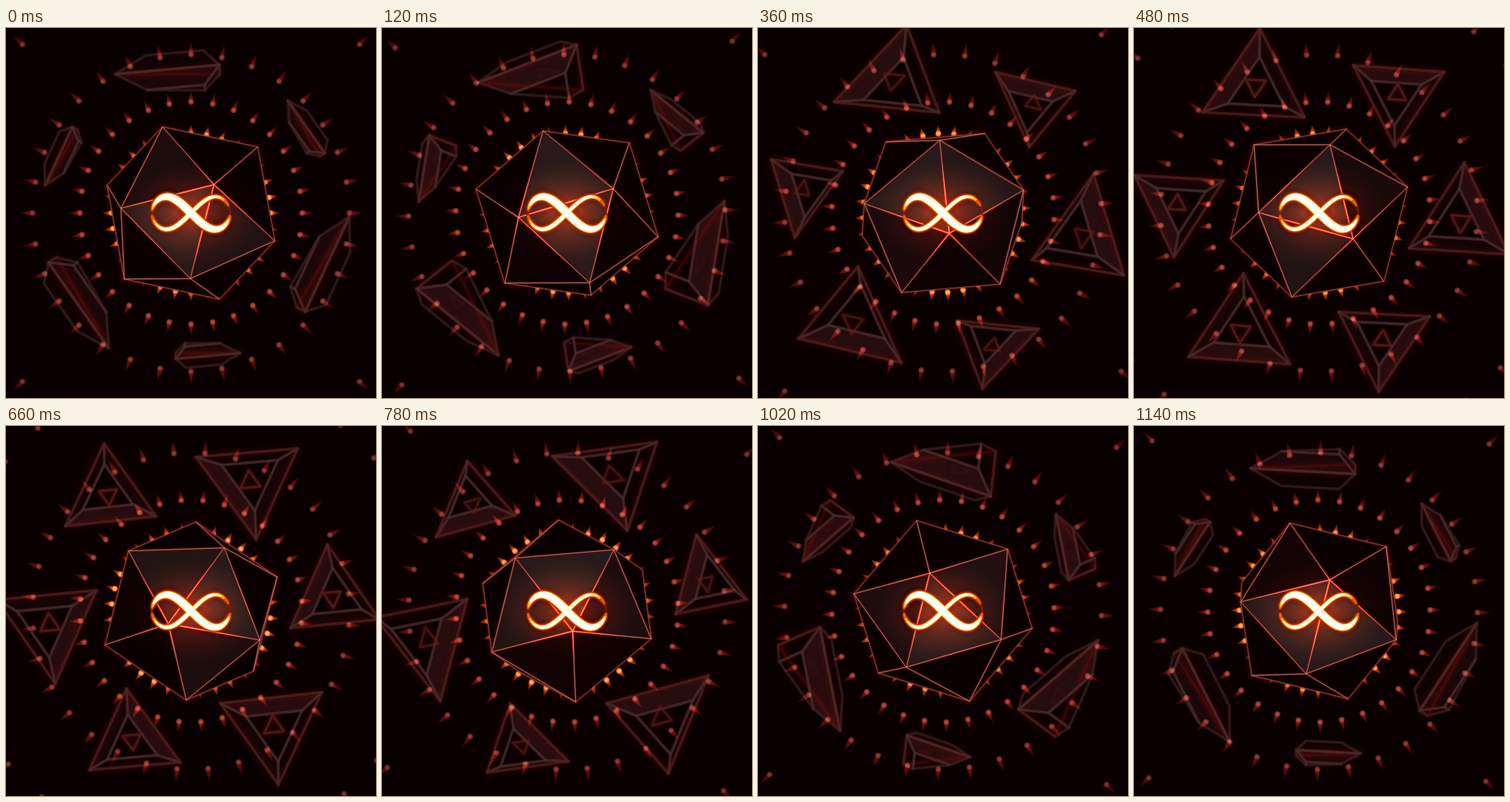
Write an HTML page with a canvas that moves like this. It is 500 by 500 pixels and loops after 1200 ms.

```html
<!DOCTYPE html>
<html lang="en">
<head>
<meta charset="utf-8">
<title>Infinity crystal</title>
<style>
  html, body { margin: 0; width: 100%; height: 100%; overflow: hidden; background: #0b0000; }
  canvas { display: block; }
</style>
</head>
<body>
<canvas id="stage" width="500" height="500"></canvas>
<script>
const ctx = document.getElementById('stage').getContext('2d');
const LOOP = 1200, STEP = 30, TAU = Math.PI * 2, PHI = (1 + Math.sqrt(5)) / 2;
const BACKGROUND = '#0b0000';
const clamp = v => Math.max(0, Math.min(1, v));

function trace(points) {
  ctx.beginPath();
  points.forEach(([x, y]) => ctx.lineTo(x, y));
  ctx.closePath();
}

function stroke(color, width, glow = 0, glowColor = color) {
  ctx.strokeStyle = color;
  ctx.lineWidth = width;
  ctx.shadowBlur = glow;
  ctx.shadowColor = glowColor;
  ctx.stroke();
  ctx.shadowBlur = 0;
}

function signedArea(points) {
  return points.reduce((sum, [x, y], i) => {
    const [nx, ny] = points[(i + 1) % points.length];
    return sum + (x * ny - y * nx) / 2;
  }, 0);
}

// --- Sparks: rings of 32 drops with tails pointing outwards
const rings = [
  { radius: 107, turn: -1, tail: 13, head: '255,205,130', body: '225,70,15' },
  { radius: 150, turn: 1, tail: 16, head: '135,82,74', body: '112,20,10' },
  { radius: 214, turn: -1, tail: 19, head: '105,70,66', body: '92,16,10' },
  { radius: 322, turn: -1, tail: 19, head: '90,66,64', body: '70,12,8' }
];

function drawRing({ radius, turn, tail, head, body }, t) {
  const fade = ctx.createLinearGradient(0, -radius + 3, 0, -radius - tail);
  fade.addColorStop(0, `rgba(${body},.35)`);
  fade.addColorStop(.4, `rgba(${body},.9)`);
  fade.addColorStop(1, `rgba(${body},.15)`);
  const spot = ctx.createRadialGradient(0, -radius, 0, 0, -radius, 5);
  spot.addColorStop(0, `rgba(${head},.85)`);
  spot.addColorStop(.5, `rgba(${head},.6)`);
  spot.addColorStop(1, `rgba(${body},0)`);
  for (let i = 0; i < 32; i++) {
    ctx.save();
    ctx.rotate((i + turn * t) * TAU / 32);
    ctx.beginPath();
    ctx.arc(0, -radius, 3.8, 0, Math.PI);
    ctx.lineTo(0, -radius - tail);
    ctx.fillStyle = fade;
    ctx.fill();
    ctx.fillStyle = spot;
    ctx.fillRect(-5, -radius - 5, 10, 10);
    ctx.restore();
  }
}

// --- Outer crystals: truncated triangular bipyramids tumbling along their orbit
function drawCrystal(index, t) {
  const tilt = Math.PI * (t + .025), s = Math.sin(tilt), c = Math.cos(tilt);
  const scale = 1 + (index % 2 ? -.24 : .24) * c;
  const triangle = (size, height, offset = Math.PI) => [0, 1, 2].map(k => {
    const a = offset + k * TAU / 3;
    const across = size * Math.sin(a) * s - height * c;
    return [size * Math.cos(a) * scale, across * scale];
  });
  const middle = triangle(76, 0), top = triangle(42, 19), bottom = triangle(42, -19);
  const sides = [0, 1, 2].flatMap(k => {
    const n = (k + 1) % 3;
    return [[middle[k], middle[n], top[n], top[k]], [middle[n], middle[k], bottom[k], bottom[n]]];
  }).filter(face => signedArea(face) > 0);

  ctx.save();
  ctx.rotate((-2.5 - 60 * t + 60 * index) * Math.PI / 180);
  ctx.translate(0, -192);
  ctx.scale(1, -1);
  ctx.lineJoin = 'round';
  for (const face of sides) {
    trace(face);
    const breadth = signedArea(face) / scale ** 2;
    ctx.fillStyle = `rgba(66,26,28,${.05 + .45 * clamp((breadth - 1500) / 600)})`;
    ctx.fill();
  }
  trace(middle);
  stroke('rgba(100,14,8,.35)', 4, 9, 'rgba(150,18,8,.9)');
  const outlines = [...sides, top];
  for (const face of outlines) {
    trace(face);
    stroke('rgba(82,18,14,.24)', 5);
  }
  for (const face of outlines) {
    trace(face);
    stroke('rgba(68,54,53,.42)', 3.2);
  }
  ctx.globalAlpha = s * s;
  trace(triangle(15, 0, 0));
  stroke('rgba(84,34,30,.75)', 3.5, 6, 'rgb(100,14,8)');
  ctx.restore();
}

// --- Icosahedron: half a turn about one of its two-fold axes per loop
const axes = [[.962, .203, -.188], [.239, -.951, .195], [.139, .2325, .963]];
const solid = [];
for (const a of [-1, 1]) {
  for (const b of [-PHI, PHI]) solid.push([a, b, 0], [0, a, b], [b, 0, a]);
}
const touching = (i, j) =>
  Math.abs(Math.hypot(...solid[i].map((v, k) => v - solid[j][k])) - 2) < .01;
const facets = [];
for (let i = 0; i < 12; i++)
  for (let j = i + 1; j < 12; j++)
    for (let k = j + 1; k < 12; k++)
      if (touching(i, j) && touching(j, k) && touching(i, k)) facets.push([i, j, k]);

function drawIcosahedron(t) {
  const s = Math.sin(Math.PI * t), c = Math.cos(Math.PI * t);
  const points = solid.map(([x, y, z]) => {
    const turned = [x * c + z * s, y, z * c - x * s];
    return [0, 1, 2].map(k => 66.8 * turned.reduce((sum, v, i) => sum + v * axes[i][k], 0));
  });
  const visible = facets.map(f => f.map(i => points[i]))
    .map(face => ({ face, facing: (face[0][2] + face[1][2] + face[2][2]) / 303 }))
    .filter(({ facing }) => facing > 0);
  ctx.lineJoin = 'round';
  for (const { face } of visible) {
    trace(face);
    stroke('rgba(120,18,8,.4)', 3, 7, 'rgba(160,22,8,.8)');
  }
  for (const { face, facing } of visible) {
    trace(face);
    ctx.fillStyle = BACKGROUND;
    ctx.fill();
    const light = clamp((facing - .62) / .26);
    ctx.fillStyle = `rgba(40,${12 + 14 * light},${14 + 12 * light},${light})`;
    ctx.fill();
  }
  for (const { face } of visible) {
    trace(face);
    stroke('rgba(125,26,16,.28)', 2.8, 3, 'rgba(130,20,8,.5)');
  }
  for (const { face } of visible) {
    trace(face);
    stroke('rgba(200,150,143,.46)', 1);
  }
}

// --- Glowing infinity sign with a calligraphic stroke
function infinityPass(color, extra, cut = 0, glow = 0, glowColor = color) {
  const at = p => [53 * Math.sin(p), 21.5 * (Math.sin(2 * p) + .12 * Math.sin(4 * p))];
  ctx.lineCap = 'round';
  for (let i = 0; i < 96; i++) {
    const p = i * TAU / 96, cos = Math.cos(p);
    const weight = .6 + 6 * Math.abs(cos) + 5.5 * Math.max(0, cos) + .8 * (Math.sin(p) < 0);
    if (weight < cut) continue;
    ctx.beginPath();
    ctx.moveTo(...at(p));
    ctx.lineTo(...at(p + TAU / 96));
    stroke(color, Math.max(.8, weight + extra), glow, glowColor);
  }
}

// Heats whatever lies around the centre: edges turn orange, dark faces stay dark.
function drawHeat() {
  ctx.save();
  ctx.scale(1, .75);
  const heat = ctx.createRadialGradient(0, 0, 20, 0, 0, 95);
  heat.addColorStop(0, 'rgb(185,125,50)');
  heat.addColorStop(.5, 'rgb(120,70,25)');
  heat.addColorStop(1, 'rgb(0,0,0)');
  ctx.globalCompositeOperation = 'color-dodge';
  ctx.fillStyle = heat;
  ctx.beginPath();
  ctx.arc(0, 0, 95, 0, TAU);
  ctx.fill();
  ctx.restore();
}

function drawInfinity() {
  infinityPass('rgba(120,30,0,.12)', 5, 3, 12, 'rgba(200,60,0,.3)');
  infinityPass('#7c1d04', 1);
  infinityPass('#e8620a', .3, 2.2, 3, '#d04400');
  infinityPass('#ffb433', -1, 3.6);
  infinityPass('#ffe98a', -1.8, 4.4);
  infinityPass('#fffdf0', -2.8, 5.2);
}

function draw(t) {
  ctx.setTransform(1, 0, 0, 1, 0, 0);
  ctx.fillStyle = BACKGROUND;
  ctx.fillRect(0, 0, 500, 500);
  ctx.translate(250, 250);
  for (let i = 0; i < 6; i++) drawCrystal(i, t);
  ctx.globalCompositeOperation = 'lighter';
  rings.forEach(ring => drawRing(ring, t));
  ctx.globalCompositeOperation = 'source-over';
  drawIcosahedron(t);
  drawHeat();
  drawInfinity();
}

let shown = -1;
function tick(now) {
  // The last pose is held for two steps.
  const step = Math.min(38, Math.floor(now % LOOP / STEP));
  if (step !== shown) draw((shown = step) * STEP / LOOP);
  requestAnimationFrame(tick);
}
tick(0);
</script>
</body>
</html>
```
